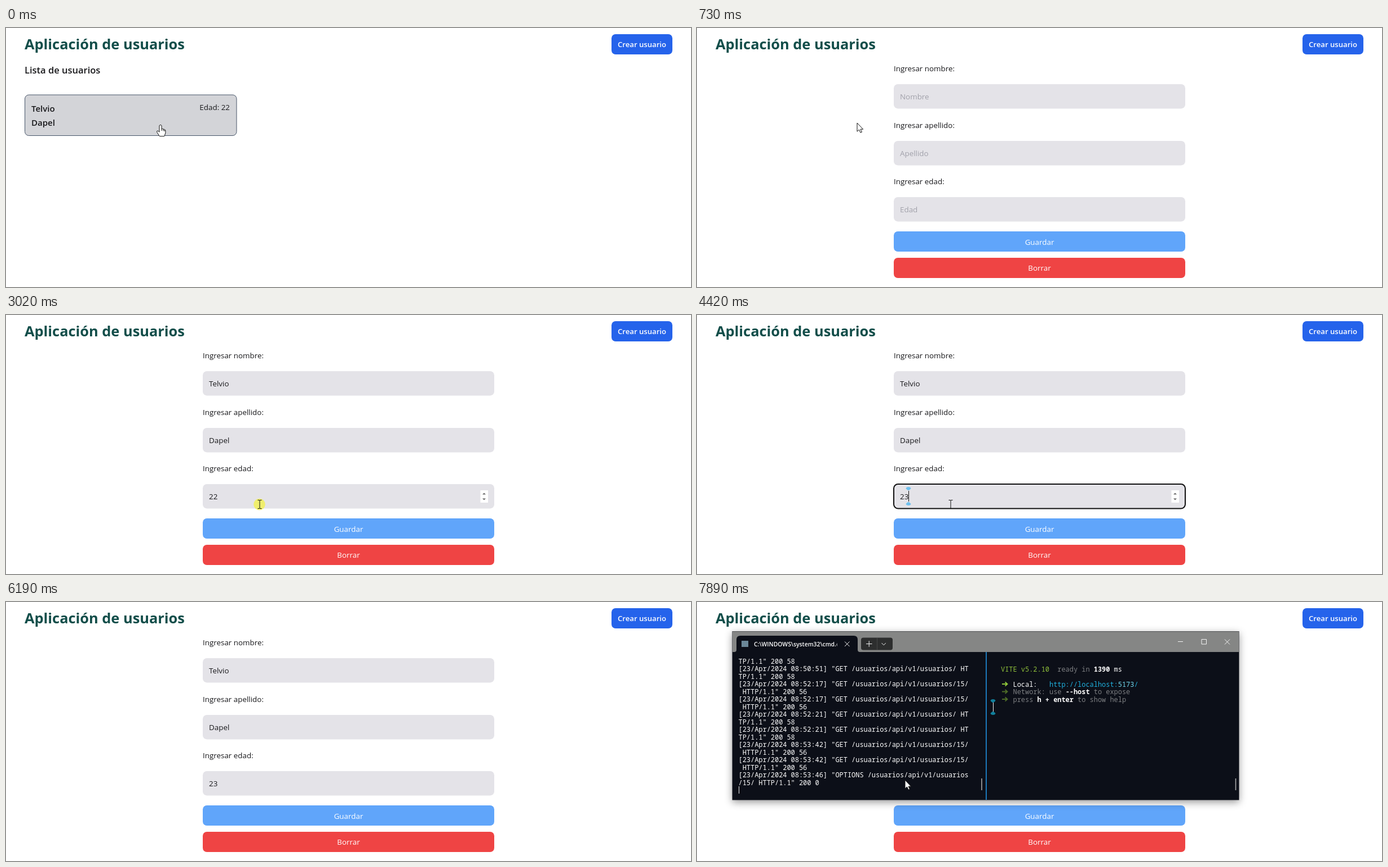
Recreate the animation shown at these times as an HTML page. Size 1215 by 461 pixels, loop 8 s.

```html
<!DOCTYPE html>
<html lang="es">
<head>
<meta charset="utf-8">
<title>Aplicación de usuarios</title>
<style>
  html, body { margin: 0; width: 100%; height: 100%; overflow: hidden; background: #fff; }
  svg { display: block; width: 100%; height: 100%; }
  text { font: 13.4px "Open Sans", "Noto Sans", sans-serif; fill: #18181b; white-space: pre; }
  .semi { font-weight: 600; }
  .light { fill: #fff; }
  .mid { text-anchor: middle; }
  .field { fill: #e4e3e8; }
  .hint { fill: #a1a1aa; }
  .mono text { font: 500 11.95px "Noto Sans Mono", "DejaVu Sans Mono", monospace; fill: #fff; }
  .mono .dim { fill: #7d7f82; }
  .mono .lime { fill: #8fbf3a; }
  .mono .bold { font-weight: 600; fill: #fff; }
  .mono .link { fill: #1fb0de; }
  .mono .port { fill: #72d8ee; }
  .line { fill: none; stroke: #f4f4f4; }
</style>
</head>
<body>
<svg viewBox="0 0 1215 461" preserveAspectRatio="none">
  <defs>
    <path id="grip" d="M-4.5 0Q-4 -3 0 -3T4.5 0L1 3H-1Z"/>
    <path id="arrowGlyph" d="M0 0H9M5.5 -3.5L9.5 0L5.5 3.5" fill="none" stroke-width="1.9"/>
    <clipPath id="tabClip"><rect x="100" y="62" width="148.5" height="26"/></clipPath>
  </defs>

  <text x="33" y="38" style="font-size:25.4px;font-weight:700;fill:#134e4a">Aplicación de usuarios</text>
  <rect x="1074" y="11" width="108" height="36" rx="7.2" fill="#2563eb"/>
  <text class="semi light mid" x="1128" y="34" style="font-size:13.15px">Crear usuario</text>

  <g id="list">
    <text class="semi" x="33" y="80.5" style="font-size:16.5px">Lista de usuarios</text>
    <rect x="33.5" y="119" width="375.5" height="72.5" rx="7" fill="#d3d4d8" stroke="#475569"/>
    <text class="semi" x="45" y="149" style="font-size:15px">Telvio</text>
    <text class="semi" x="45" y="174" style="font-size:15px">Dapel</text>
    <text x="397" y="146" text-anchor="end">Edad: 22</text>
  </g>

  <g id="form">
    <g id="fields"></g>
    <g id="spinner">
      <rect x="841.5" y="312" width="13.5" height="22" fill="#fff"/>
      <path d="M845 319.5L848 316.5L851 319.5ZM845 326.5L848 329.5L851 326.5Z" fill="#666"/>
    </g>
    <g id="focus">
      <rect x="349" y="301" width="517" height="43.5" rx="7.5" fill="none" stroke="#101010" stroke-width="2"/>
      <g fill="#6fc0ee">
        <use href="#grip" x="375" y="309"/>
        <use href="#grip" transform="translate(375 336) scale(1 -1)"/>
      </g>
    </g>
    <rect id="caret" y="313" width="1" height="19" fill="#111"/>
    <rect x="349" y="362" width="517" height="36" rx="7.2" fill="#60a5fa"/>
    <text class="light mid" x="607.5" y="385.5">Guardar</text>
    <rect x="349" y="409" width="517" height="36" rx="7.2" fill="#ef4444"/>
    <text class="light mid" x="607.5" y="432">Borrar</text>
  </g>

  <g id="terminal">
    <rect id="frame" x="62.5" y="52" width="899" height="300.5" fill="#0c0f18"/>
    <rect x="63" y="52.5" width="898" height="36.5" fill="#2d2e2e"/>
    <rect id="activeBar" x="63" y="52.5" width="898" height="36.5" fill="#858685"/>
    <path d="M66 89Q70 89 70 85V67Q70 60 77 60H278Q285 60 285 67V85Q285 89 289 89Z" fill="#0c0f18"/>
    <rect x="79" y="69" width="12" height="11" fill="#6b8798"/>
    <text class="semi light" x="101" y="78.5" clip-path="url(#tabClip)" style="font-size:10.4px">C:\WINDOWS\system32\cmd.exe</text>
    <rect x="291" y="63.5" width="56" height="22" rx="4" fill="#2d2e2e"/>
    <path class="line" d="M319.5 64V85" style="stroke:#464747"/>
    <path class="line" d="M262 70.5l8.5 8.5m0 -8.5l-8.5 8.5M300 74.5H310.5M305.2 69.2V79.8M327.5 73l3.7 3.7l3.7 -3.7M853 70.5H862M895 66.5H903.5V75H895ZM936 66.5l9 9m0 -9l-9 9"/>
    <rect x="512" y="89" width="2" height="263" fill="#1c78ba"/>
    <path class="line" d="M505 314V335M955.5 314V335" style="stroke:#aaa;stroke-width:1.6"/>
    <path class="line" d="M74.5 328V341"/>
    <path class="line" id="paneCaret"/>
    <g id="paneGrips" fill="#117f9b">
      <use href="#grip" x="525" y="176"/>
      <use href="#grip" transform="translate(525 198) scale(1 -1)"/>
    </g>
    <g class="mono" id="log"></g>
    <g class="mono">
      <text x="539" y="123.5"><tspan class="lime">VITE v5.2.10</tspan><tspan class="dim">  ready in </tspan><tspan class="bold">1390</tspan> ms</text>
      <text x="560.5" y="150.5">Local:   <tspan class="link">http://localhost:<tspan class="port">5173</tspan>/</tspan></text>
      <text class="dim" x="560.5" y="164">Network: use <tspan class="bold">--host</tspan> to expose</text>
      <text class="dim" x="560.5" y="177.5">press <tspan class="bold">h + enter</tspan> to show help</text>
    </g>
    <use href="#arrowGlyph" x="541" y="146" stroke="#8fc53a"/>
    <use href="#arrowGlyph" x="541" y="159.5" stroke="#4d6b27"/>
    <use href="#arrowGlyph" x="541" y="173" stroke="#4d6b27"/>
  </g>

  <circle id="click" r="10.3" fill="#f3f04e"/>
  <g id="pointer" stroke="#111" fill="#fff" stroke-linejoin="round">
    <path id="arrow" d="M0 0V15.2L3.5 12L6 17.3L8.4 16.2L6 11.2H10.6Z"/>
    <path id="hand" d="M-2 13.3V1.6Q0 -1 2 1.6V7.6Q3.6 6.6 5 8.2Q6.4 7.6 7.2 9Q8.9 9 8.9 10.8V15L6.8 20.7H-1.6L-6.4 13.2Q-6.8 10.4 -4.2 11.2ZM2 7.6V11M5 8.2V11.4M7.2 9V11.8"/>
    <path id="beam" d="M-3.5 -7.5H-1L0 -6.8L1 -7.5H3.5M0 -6.8V6.8M-3.5 7.5H-1L0 6.8L1 7.5H3.5" fill="none"/>
  </g>
</svg>
<script>
const LOOP = 8000;
const $ = id => document.getElementById(id);
const show = (id, on) => $(id).setAttribute("display", on ? "inline" : "none");
const within = (t, from, to) => t >= from && t < to;

// Form fields
const fields = [["nombre", "Telvio"], ["apellido", "Dapel"], ["edad", "22"]];
const rowTop = i => Math.round(100.4 + i * 100.4);
$("fields").innerHTML = fields.map(([name], i) => {
  const y = rowTop(i);
  return `<text x="349" y="${y - 23.5}">Ingresar ${name}:</text>
    <rect class="field" x="349" y="${y}" width="517" height="43.4" rx="7.2"/>
    <text id="${name}" x="360" y="${y + 27}"></text>`;
}).join("");

function setField(name, value) {
  const node = $(name);
  node.textContent = value || name[0].toUpperCase() + name.slice(1);
  node.setAttribute("class", value ? "" : "hint");
}

// Server log, wrapped at the pane width
const requests = [
  ["08:50:51", "", 58], ["08:52:17", "15/", 56], ["08:52:17", "15/", 56],
  ["08:52:21", "", 58], ["08:52:21", "", 58], ["08:53:42", "15/", 56],
  ["08:53:42", "15/", 56], ["08:53:46", "15/", 0, "OPTIONS"]
];
const logLines = ['TP/1.1" 200 58'];
for (const [time, id, size, verb = "GET"] of requests) {
  const entry = `[23/Apr/2024 ${time}] "${verb} /usuarios/api/v1/usuarios/${id} HTTP/1.1" 200 ${size}`;
  logLines.push(...entry.match(/.{1,57}/g));
}
logLines.forEach((line, i) => {
  const node = document.createElementNS("http://www.w3.org/2000/svg", "text");
  node.setAttribute("x", 73.5);
  node.setAttribute("y", 110 + i * 13.47);
  node.textContent = line;
  $("log").append(node);
});

// Pointer path: time, x, y
const path = [
  [0, 274, 172], [60, 274, 172], [160, 284, 169], [1000, 284, 169],
  [1380, 569, 160], [1530, 532, 161], [1620, 532, 161], [1960, 500, 119],
  [2410, 442, 161], [2700, 451, 340], [2820, 450, 337], [4630, 450, 337],
  [5390, 520, 385], [6119, 520, 385], [6120, 533, 416], [7750, 310, 306],
  [7890, 369, 317], [LOOP, 369, 317]
];
function pointerAt(t) {
  const i = path.findIndex(p => p[0] > t);
  const [t0, x0, y0] = path[i - 1], [t1, x1, y1] = path[i];
  if (t1 === 7750) return [x0, y0];
  const k = (t - t0) / (t1 - t0), e = k * k * (3 - 2 * k);
  return [x0 + (x1 - x0) * e, y0 + (y1 - y0) * e];
}
function pointerKind(t, x, y) {
  if (t < 730) return "hand";
  if (t > 6990 || x < 349) return "arrow";
  if (y > 362) return "hand";
  return fields.some((f, i) => within(y, rowTop(i), rowTop(i) + 43)) ? "beam" : "arrow";
}

// Clicks: start, end
const clicks = [[360, 530], [3020, 3080], [5720, 5790]];
const caretOn = [[3080, 3560], [4090, 4950], [5520, 5790]];

function render(t) {
  show("list", t < 730);
  show("form", t >= 730);
  show("terminal", t >= 6990);

  const loaded = t >= 1800;
  const age = t < 4090 ? "22" : t < 4420 ? "2" : "23";
  fields.forEach(([name, value]) => setField(name, loaded && (name === "edad" ? age : value)));

  show("focus", within(t, 3080, 5790));
  show("caret", caretOn.some(([a, b]) => within(t, a, b)));
  $("caret").setAttribute("x", age === "2" ? 367 : 375);

  const [x, y] = pointerAt(t);
  const kind = pointerKind(t, x, y);
  show("spinner", within(t, 3080, 5790) || (t < 3080 && kind === "beam" && y > 301));
  show("pointer", t < 6190 || t >= 7750);
  for (const k of ["arrow", "hand", "beam"]) show(k, k === kind);
  $("pointer").setAttribute("transform", `translate(${x} ${y})`);

  const click = clicks.find(([a, b]) => within(t, a, b));
  show("click", click);
  $("click").setAttribute("transform", `translate(${x - .5} ${y})`);
  $("click").setAttribute("opacity", click && t - click[0] > 90 ? .4 : .8);

  // The window gains focus: lighter title bar, wider shadow
  const active = Math.min(1, Math.max(0, (t - 7040) / 220));
  $("activeBar").setAttribute("opacity", active);
  $("frame").style.filter = `drop-shadow(0 ${2 + 2 * active}px ${3 + 4 * active}px rgba(0, 0, 0, .4))`;
  const gripped = t >= 7200;
  show("paneGrips", gripped);
  $("paneCaret").setAttribute("d", gripped ? "M525.5 179V195" : "M525.5 180V193");
}

function tick() {
  render(performance.now() % LOOP);
  requestAnimationFrame(tick);
}
tick();
</script>
</body>
</html>
```
